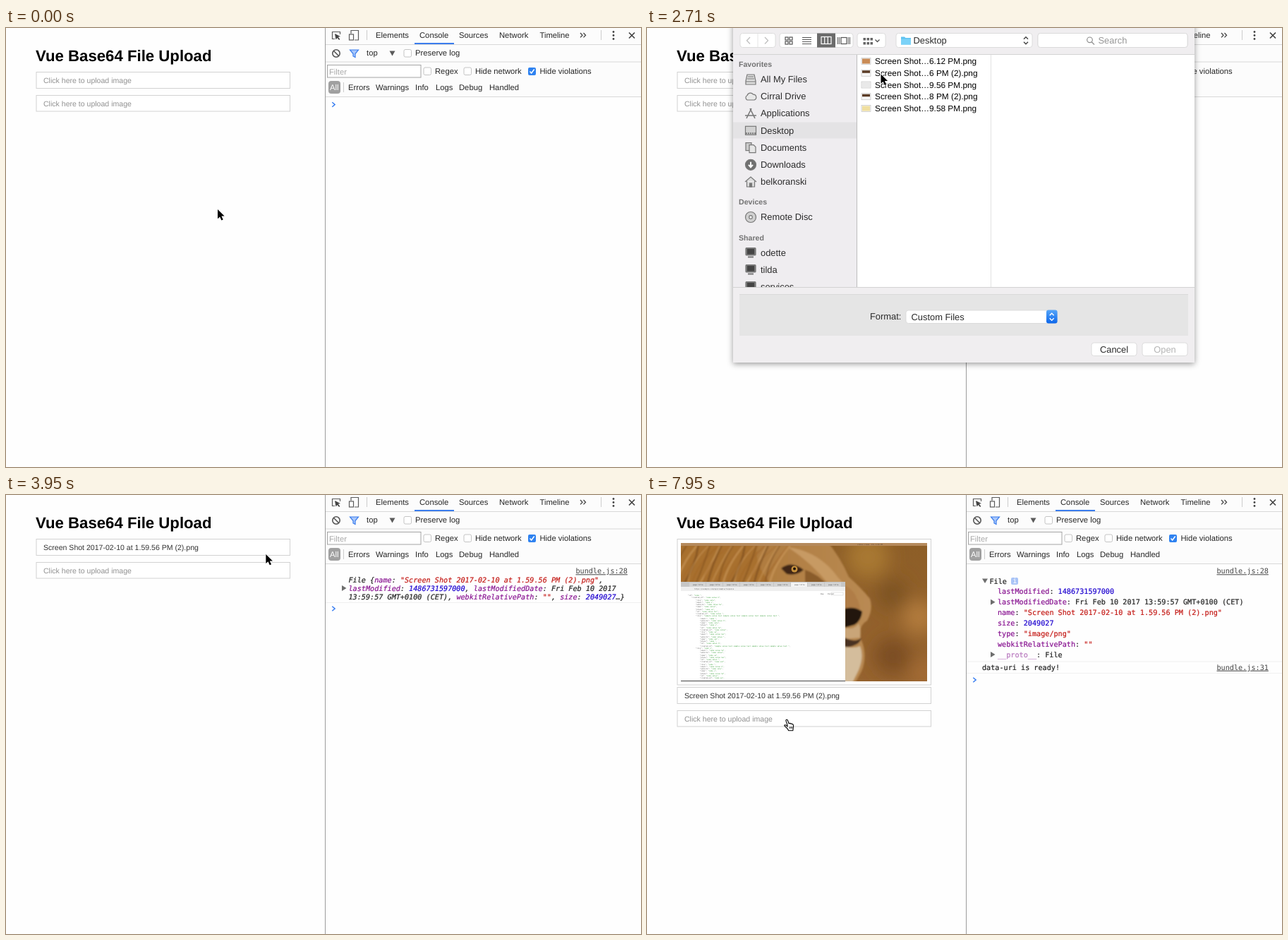
These frames come from a looping animation (900x622 px, 8 s). An HTML page:

```html
<!DOCTYPE html>
<html lang="en">
<head>
<meta charset="utf-8">
<title>File upload demo</title>
<style>
html, body { margin: 0; width: 100%; height: 100%; overflow: hidden; background: #fefefe; }
svg { display: block; width: 900px; height: 622px; text-rendering: geometricPrecision; }
text { font-family: "Liberation Sans", Arial, sans-serif; white-space: pre; }
.title { font-size: 22.2px; font-weight: bold; }
.field { font-size: 10.55px; }
.tool { font-size: 11.25px; fill: #262626; }
.mono { font: 10.16px "DejaVu Sans Mono", Menlo, monospace; fill: #222; stroke: #222; stroke-width: .2; }
.it { font-style: italic; }
.link { text-decoration: underline; fill: #444; stroke: none; }
.mac { font-size: 12.9px; fill: #2b2b2b; }
.head { font-size: 10.6px; font-weight: bold; fill: #727272; }
.file { font-size: 11.85px; }
.info { font-size: 11.9px; }
.tiny { font: 2.4px "DejaVu Sans Mono", monospace; }
</style>
</head>
<body>
<svg id="stage" viewBox="0 0 900 622"></svg>
<script>
const $ = id => document.getElementById(id);
const text = (x, y, s, cls, a = '') => `<text x="${x}" y="${y}" class="${cls}" ${a}>${s}</text>`;
const rect = (x, y, w, h, fill, a = '') =>
  `<rect x="${x}" y="${y}" width="${w}" height="${h}" fill="${fill}" ${a}/>`;
const line = (d, color, a = '') => `<path d="${d}" fill="none" stroke="${color}" ${a}/>`;
const shape = (d, fill, a = '') => `<path d="${d}" fill="${fill}" ${a}/>`;
const disc = (x, y, r, fill, a = '') => `<circle cx="${x}" cy="${y}" r="${r}" fill="${fill}" ${a}/>`;
const group = (id, s, a = '') => `<g id="${id}" ${a}>${s}</g>`;
const ink = color => s => `<tspan fill="${color}" stroke="${color}">${s}</tspan>`;
const key = ink('#881391'), str = ink('#c41a16'), num = ink('#1c00cf'), proto = ink('#b878be');

const fileName = 'Screen Shot 2017-02-10 at 1.59.56 PM (2).png';
const box = (y, h) => rect(43, y, 359.5, h, '#fff', 'stroke="#d2d2d2"');

// Soft lion portrait in a few tones, 349 x 196
function lion() {
  let mane = '';
  for (let i = 0; i < 26; i++)
    mane += line(`M${i * 5.5 - 12} 58q${2 + i % 4 * 5}-28 ${20 + i % 3 * 9}-54`,
      ['#6f4218', '#d3a062', '#a2672a'][i % 3], `stroke-width="${1.5 + i % 2}" opacity=".6"`);
  return rect(0, 0, 349, 196, 'url(#dusk)') +
    `<g filter="url(#haze)">${disc(265, 20, 30, '#a87833') + disc(300, 72, 22, '#7d5222') +
      disc(338, 105, 24, '#b27b3c') + disc(300, 160, 26, '#7b4e20') + disc(345, 185, 20, '#a46c35')}</g>` +
    `<g filter="url(#soft)">` +
    shape('M-5-4H206Q226 20 238 48 254 62 268 79 273 94 264 110 250 118 256 138 265 160 256 182L246 200H-5Z', 'url(#fur)') +
    shape('M-5-4H112Q98 24 128 58H-5Z', '#a8702f') + mane +
    shape('M152 6Q196 12 222 48L250 78 236 92 214 64Q188 30 152 6Z', '#c79a64') +
    shape('M176 38Q204 46 232 92V58H176Z', '#8a5b2c') +
    shape('M232 60Q250 68 254 94L232 92Z', '#b07d47') +
    shape('M142 36Q156 24 174 38 164 47 150 44Z', '#3f2613') +
    shape('M232 93Q246 89 257 97 256 110 246 116L232 120Z', '#24160f') +
    shape('M232 120Q246 124 252 114 256 122 254 134L232 136Z', '#c9a578') +
    shape('M232 134Q248 142 256 134 254 146 232 148Z', '#4a3020') +
    shape('M232 147Q246 150 254 146 260 160 252 180L242 200H232Z', '#d4bd9c') + '</g>' +
    disc(161, 37, 4.5, '#c8923c') + disc(161, 36.5, 2, '#21150c');
}

// Thumbnail: the portrait behind a small browser window
function picture() {
  const words = ['"id"', '"name"', '"email"', '"created_at"', '"phone"', '"website"', '"role"'];
  let rows = '';
  for (let i = 0; i < 37; i++) {
    const long = i === 9 || i === 22;
    const indent = i < 2 ? 10 + i * 5 : i < 10 || i === 23 ? 21 : 27;
    const value = long ? '"' + 'sample value text '.repeat(4) + '"' : '"' + 'some value here'.slice(0, 5 + i * 7 % 10) + '"';
    rows += text(indent, 75 + i * 3.25, `${words[i * 3 % 7]}: <tspan fill="#2f9a2f">${value}</tspan>,`, 'tiny', 'fill="#555"');
  }
  let tabs = '';
  for (let i = 0; i < 9; i++)
    tabs += rect(12 + i * 24, 56, 23, 6, i === 6 ? '#f4f4f4' : '#d4d4d4') + text(17 + i * 24, 60, 'page title', 'tiny', 'fill="#444"');
  return lion() +
    rect(0, 0, 349, 4, '#b58a5d') + text(250, 3, 'status items  Fri 1:59 PM', 'tiny', 'fill="#543"') +
    rect(0, 55, 233, 141, '#fff') + rect(0, 55, 233, 7, '#c6c6c6') + tabs +
    rect(0, 62, 233, 6, '#eeeeee') + text(19, 66, 'https://example.com/api/sample/response', 'tiny', 'fill="#555"') +
    text(198, 73, 'Raw    Parsed', 'tiny', 'fill="#444"') + rect(213, 70, 17, 4, 'none', 'stroke="#ccc" stroke-width=".5"') +
    rows + rect(0, 195, 233, 1, '#444');
}

function page() {
  return text(42, 47, 'Vue Base64 File Upload', 'title') +
    group('photo', box(62.5, 206.5) + '<use href="#pic" x="48" y="68"/>') +
    group('inputs', box(62.5, 23) + box(95.5, 22.5) +
      group('hint', text(53, 78, 'Click here to upload image', 'field', 'fill="#919191"')) +
      group('chosen', text(53, 78, fileName, 'field', 'fill="#333"')) +
      text(53, 110.5, 'Click here to upload image', 'field', 'fill="#919191"'));
}

const check = (x, y) => rect(x - 5, y - 5, 10.5, 10.5, '#fff', 'rx="2" stroke="#c4c4c4"');

function devtools() {
  const tabs = [[524, 'Elements'], [586, 'Console'], [642, 'Sources'], [699, 'Network'], [756.5, 'Timeline']];
  const levels = [[485, 'Errors'], [524, 'Warnings'], [580, 'Info'], [609, 'Logs'], [642, 'Debug'], [685, 'Handled']];
  return rect(453, 0, 447, 622, '#fefefe') + rect(453, 0, 447, 97, '#fcfcfc') +
    line('M453 23.5H900M453 48H900M453 97.5H900', '#d8d8d8') + line('M452.5 0V622', '#9c9c9c') +
    rect(579, 21, 56, 2, '#3b7ded') +
    tabs.map(([x, s]) => text(x, 14, s, 'tool')).join('') +
    line('M473.5 9V5.5H462.5V15.5H466', '#5a5a5a', 'stroke-width="1.2"') +
    shape('M466 8L474 12 470.8 12.8 473.4 16 472 17 469.5 14 467.5 16.5Z', '#444') +
    line('M489 8V3.5H499.5V17H494', '#5a5a5a', 'stroke-width="1.2"') + rect(486.5, 9, 6, 8, '#fff', 'stroke="#5a5a5a" stroke-width="1.2"') +
    line('M511.5 3V17M843.5 3V17M478.5 77V91', '#ccc') +
    line('M814 7l3 3.2-3 3.2M818.5 7l3 3.2-3 3.2', '#444', 'stroke-width="1.3"') +
    [5.5, 10.5, 15.5].map(y => disc(861, y, 1.4, '#444')).join('') +
    line('M883 6.5l8 8m0-8l-8 8', '#444', 'stroke-width="1.7"') +
    disc(468, 36, 5.2, 'none', 'stroke="#555" stroke-width="1.6"') + line('M464.5 32.5l7 7', '#555', 'stroke-width="1.6"') +
    shape('M487.5 31H499.5L495 36.5V41.5L492 40V36.5Z', '#a9c8fb', 'stroke="#3b7ded" stroke-width="1.2"') +
    text(511, 39, 'top', 'tool') + shape('M543.5 32.5H551.5L547.5 39.5Z', '#5a5a5a') +
    check(569, 35.5) + text(580, 39, 'Preserve log', 'tool') +
    rect(455.5, 52.5, 132.5, 17.5, '#fff', 'stroke="#a4a4a4"') + text(458, 65.5, 'Filter', 'tool', 'style="fill:#aaa"') +
    check(597, 61) + text(608, 65, 'Regex', 'tool') + check(654, 61) + text(665, 65, 'Hide network', 'tool') +
    rect(740, 56, 11, 11, '#2f82f0', 'rx="2"') + line('M742.5 61.5l2.2 2.5 4-5.5', '#fff', 'stroke-width="1.5"') +
    text(756.5, 65, 'Hide violations', 'tool') +
    rect(457, 75, 17, 18, '#a0a0a0', 'rx="4"') + text(459, 87.5, 'All', 'tool', 'style="fill:#fff"') +
    levels.map(([x, s]) => text(x, 87.5, s, 'tool')).join('');
}

const right = (x, y) => shape(`M${x} ${y - 4}l6.5 4-6.5 4Z`, '#6e6e6e');
const down = (x, y) => shape(`M${x} ${y - 3}h8l-4 6.5Z`, '#6e6e6e');

function consoleLog() {
  const rows = [
    `${key('lastModified')}: ${num(1486731597000)}`,
    `${key('lastModifiedDate')}: Fri Feb 10 2017 13:59:57 GMT+0100 (CET)`,
    `${key('name')}: ${str(`"${fileName}"`)}`,
    `${key('size')}: ${num(2049027)}`,
    `${key('type')}: ${str('"image/png"')}`,
    `${key('webkitRelativePath')}: ${str('""')}`,
    `${proto('__proto__')}: File`];
  return group('log', text(807.5, 111.3, 'bundle.js:28', 'mono link')) +
    group('folded',
      text(485.5, 123.5, `File {${key('name')}: ${str(`"${fileName}"`)},`, 'mono it') +
      text(485.5, 135.5, `${key('lastModified')}: ${num(1486731597000)}, ${key('lastModifiedDate')}: Fri Feb 10 2017`, 'mono it') +
      text(485.5, 147.5, `13:59:57 GMT+0100 (CET), ${key('webkitRelativePath')}: ${str('""')}, ${key('size')}: ${num(2049027)}…}`, 'mono it') +
      right(476, 132) + line('M453 152.5H900', '#f0f0f0')) +
    group('unfolded', down(475, 121.5) + text(485.5, 125.5, 'File', 'mono') +
      rect(516, 117, 10, 10, '#a9c4f7', 'rx="2"') + text(518.2, 125.3, 'i', 'mono', 'style="fill:#fff;stroke:none"') +
      rows.map((s, i) => text(497, 140.3 + i * 14.9, s, 'mono')).join('') +
      right(487, 151.8) + right(487, 226) + line('M453 236H900', '#f0f0f0')) +
    group('ready', text(475, 3.7, 'data-uri is ready!', 'mono') + text(807.5, 3.7, 'bundle.js:31', 'mono link') +
      line('M453 8.5H900', '#f0f0f0')) +
    group('prompt', line('M462.3 -3.3l3.8 3.3-3.8 3.3', '#367cf1', 'stroke-width="1.5"')) +
    group('caret', rect(475, 256, 1, 12, '#000'));
}

const updown = (x, y, c) => line(`M${x - 3} ${y - 2}l3-3 3 3M${x - 3} ${y + 2}l3 3 3-3`, c, 'stroke-width="1.4"');
const button = (x, y, w, h, fill = '#fff') => rect(x, y, w, h, fill, 'rx="3.5" stroke="#d6d6d6" stroke-width=".8"');
const item = (y, s, icon) => `<g transform="translate(147 ${y})" stroke="#777" stroke-width="1.2" fill="none">${icon}</g>` +
  text(161, y + 4.4, s, 'mac');

function sidebar() {
  const monitor = rect(-7, -7, 14, 10.5, '#777', 'rx="1"') + rect(-5, -5.5, 10, 7.5, '#444', 'stroke="none"') + line('M-4 6H4', '#777', 'stroke-width="2"');
  const screen = rect(-7.5, -6, 15, 12, '#d2d2d2') + line('M-7 4H7', '#777', 'stroke-width="2" stroke-dasharray="2 1"');
  return group('marked', rect(122, 133.5, 175, 23, '#e4e3e5')) +
    text(130, 55, 'Favorites', 'head') +
    item(73, 'All My Files', shape('M-5-7H5L7 2V7H-7V2Z', '#ddd') + line('M-4-4H4M-5-1H5M-7 3H7', '#777')) +
    item(97, 'Cirral Drive', shape('M-5 5A3.6 3.6 0 0 1-5-1.5A4.8 4.8 0 0 1 3.5-2.8A4 4 0 0 1 5 5Z', '#e8e8e8')) +
    item(121, 'Applications', line('M-6 7L1-7M6 7L-1-7M-8 3H8', '#777', 'stroke-width="1.6"')) +
    item(145.3, 'Desktop', screen) +
    item(169.6, 'Documents', rect(-7, -7, 8, 11, '#ccc') + shape('M-2-4H4L7-1V7H-2Z', '#e6e6e6')) +
    item(193.8, 'Downloads', disc(0, 0, 7.5, '#707070') + line('M0-4V3M-3 0L0 3.5 3 0', '#fff', 'stroke-width="2"')) +
    item(218, 'belkoranski', shape('M-8 0L0-7 8 0M-5.5-1V7H5.5V-1', '#ddd') + rect(-1.5, 2, 3, 5, '#777')) +
    text(130, 250, 'Devices', 'head') +
    item(268, 'Remote Disc', disc(0, 0, 7.5, '#d0d0d0') + disc(0, 0, 2.3, '#f2f2f2')) +
    group('media', text(130, 300.5, 'Media', 'head') +
      item(318.5, 'Photos', rect(-7.5, -4, 15, 10, '#777', 'rx="1.5"') + rect(-3, -6, 6, 3, '#777') + disc(0, 1, 3.2, '#777', 'stroke="#eee"')) +
      text(130, 351, 'Tags', 'head') + item(368, 'Красный', disc(0, 0.5, 5.5, '#ff4d47', 'stroke="#e8443e"'))) +
    group('shared', text(130, 300.5, 'Shared', 'head') +
      item(318.5, 'odette', monitor) + item(342.5, 'tilda', monitor) + item(366.5, 'services', monitor));
}

function fileList() {
  const names = ['6.12 PM', '6 PM (2)', '9.56 PM', '8 PM (2)', '9.58 PM'];
  const tones = ['#c98b55', '#5a3b25', '#e9e9e9', '#5a3b25', '#f0dfa0'];
  return names.map((s, i) => {
    const y = 47 + i * 16.75;
    return rect(304, y - 4.5, 13, 9, '#f6f6f6', 'stroke="#bbb" stroke-width=".6"') +
      rect(305, y - 3.5, 11, i % 2 ? 3.5 : 7, tones[i]) +
      text(323, y + 4.1, `Screen Shot…${s}.png`, 'file', i === 1 ? 'id="picked"' : '');
  }).join('');
}

function preview() {
  const when = 'February 10, 2017 at 1:59 PM';
  const facts = [['Created', when], ['Modified', when], ['Last opened', when], ['Dimensions', '1920 × 1080']];
  return '<use href="#pic" transform="translate(517 52) scale(.66)"/>' +
    ['Screen Shot', '2017-02-10 at 1.59.56', 'PM (2).png'].map((s, i) => text(609, 204 + i * 18, s, 'info', 'style="font-size:15px;font-weight:bold"')).join('') +
    text(609, 255.5, 'PNG image - 2 MB', 'info', 'fill="#8c8c8c"') +
    facts.map(([a, b], i) => text(601, 272.6 + i * 15.8, a, 'info', 'fill="#8c8c8c" text-anchor="end"') + text(609, 272.6 + i * 15.8, b, 'info')).join('') +
    text(609, 335.8, 'Add Tags…', 'info', 'fill="#1a7ff0"');
}

function dialog() {
  let grid = '';
  for (let i = 0; i < 4; i++) grid += rect(196 + i % 2 * 6, 13 + (i >> 1) * 6, 4, 4, 'none', 'stroke="#555" stroke-width="1.2"');
  for (let i = 0; i < 6; i++) grid += rect(306.5 + i % 3 * 5, i > 2 ? 20 : 14, 3.5, 3.5, '#666');
  return rect(122, -8, 654, 482, '#f0eef0', 'style="filter:drop-shadow(0 2px 4px rgba(0,0,0,.4))"') +
    rect(122, 38, 175, 329, '#efedf0') + rect(298, 38, 478, 329, '#fff') +
    line('M122 37.5H776M122 367.5H776', '#d3d3d3') + line('M297.5 38V367', '#bdbdbd') + line('M487.5 38V367', '#e2e2e2') +
    button(132, 7.5, 50, 20) + line('M157 8V27', '#e4e4e4') +
    line('M146 13l-4.5 4.7 4.5 4.7M167 13l4.5 4.7-4.5 4.7', '#c2c2c2', 'stroke-width="1.4"') +
    button(188, 7.5, 104, 20) + rect(241, 7.5, 26, 20, '#6b6b6b') + button(298, 7.5, 40, 20) + grid +
    line('M220 13.5H233M220 16.5H233M220 19.5H233M220 22.5H233', '#555', 'stroke-width="1.2"') +
    rect(247, 12.5, 14, 10, 'none', 'stroke="#fff" stroke-width="1.2"') + line('M251.7 12V23M256.3 12V23', '#fff', 'stroke-width="1.2"') +
    rect(275, 13.5, 8, 9, 'none', 'stroke="#555" stroke-width="1.2"') + line('M270.5 13V23M272.7 13V23M285.3 13V23M287.5 13V23', '#555') +
    line('M323.5 16.5l3 3 3-3', '#555', 'stroke-width="1.4"') +
    button(353, 7.5, 193, 20) + updown(537, 17.7, '#444') +
    group('folder', shape('M360 12.5h5l1.5 1.5H374V23.5H360Z', '#5fc3f2') + rect(360, 15.5, 14, 8, '#7ad2f8') + text(377.5, 22.3, 'Desktop', 'mac')) +
    button(554, 7.5, 212, 20, '#f4f3f4') + group('searchBox', button(554, 7.5, 212, 20)) +
    group('search', disc(627.5, 16.8, 3.8, 'none', 'stroke="#8c8c8c" stroke-width="1.2"') + line('M630.3 19.8l3.7 3.8', '#8c8c8c', 'stroke-width="1.3"') +
      text(639.5, 22.3, 'Search', 'mac', 'style="fill:#969696"')) +
    `<g clip-path="url(#side)">${sidebar()}</g>` +
    group('row', rect(298, 55.5, 189, 17, '#116cd6')) + group('files', fileList()) + group('preview', preview()) +
    rect(131, 377.5, 636, 58.5, '#e5e5e5') + line('M131 377.5H767', '#dadada') +
    text(316, 413.3, 'Format:', 'mac') + button(367, 400, 214.5, 18.5) + text(374.5, 413.7, 'Custom Files', 'mac') +
    group('grayStep', updown(573.7, 409.2, '#444')) +
    group('blueStep', rect(566, 399.6, 15.6, 19, 'url(#blue)', 'rx="3"') + updown(573.7, 409.2, '#fff')) +
    button(630, 446, 64, 18.5) + text(662, 459.6, 'Cancel', 'mac', 'text-anchor="middle"') +
    button(702, 446, 64, 18.5) + group('enabled', rect(702, 445.6, 64.5, 19.3, 'url(#blue)', 'rx="3.5"')) +
    text(734, 459.6, 'Open', 'mac', 'id="open" text-anchor="middle"');
}

const gradient = (id, a, b, dir = 'x2="0" y2="1"') =>
  `<linearGradient id="${id}" ${dir}><stop stop-color="${a}"/><stop offset="1" stop-color="${b}"/></linearGradient>`;
const blur = (id, r) => `<filter id="${id}" x="-.3" y="-.3" width="1.6" height="1.6"><feGaussianBlur stdDeviation="${r}"/></filter>`;

$('stage').innerHTML = `<defs>${gradient('dusk', '#8d5e27', '#96632f')}${gradient('fur', '#a8712f', '#b98a53', '')}
  ${gradient('blue', '#55a5f9', '#0c66ea')}${blur('soft', 1)}${blur('haze', 12)}
  <clipPath id="side">${rect(122, 38, 175, 329, '#000')}</clipPath>
  <clipPath id="frame">${rect(0, 0, 349, 196, '#000')}</clipPath>
  <g id="pic" clip-path="url(#frame)">${picture()}</g></defs>` +
  page() + devtools() + consoleLog() + group('dialog', dialog()) +
  group('arrow', shape('M0 0V13.2L3.1 10.4 5.4 15.4 7.7 14.4 5.4 9.6H9.6Z', '#000', 'stroke="#fff" stroke-width="1.6" paint-order="stroke"')) +
  group('hand', shape('M5 8.6L3 2.6Q2.6 1 3.8.8 5 .6 5.4 1.8L7 6.2Q8.6 5.4 9.2 6.6 10.6 5.9 11.3 7 12.8 6.7 13.2 8 14 11 13.2 13L12.8 16.2H6.6Q5.5 13.5 3.5 12L1 9.7Q.3 8.6 1.6 8.3 3 8.2 5 10.4Z',
    '#fff', 'stroke="#000" stroke-width="1.1"') + line('M8.2 10.5V13.5M10 10.5V13.5M11.7 10.5V13.5', '#000', 'stroke-width=".8"'));

// The screen refreshes in bursts: first time, last time, number of updates
const bursts = [[0, 0, 1], [150, 450, 3], [750, 750, 1], [1190, 1490, 3], [1640, 2120, 4], [2270, 2710, 4],
  [3010, 3300, 3], [3440, 3590, 2], [3950, 4530, 5], [4680, 4980, 3], [5130, 5130, 1], [5420, 6020, 5],
  [6470, 7500, 8], [7650, 7650, 1], [7950, 7950, 1]];
const ticks = bursts.flatMap(([a, b, n]) =>
  Array.from({ length: n }, (_, i) => Math.round(a + (n > 1 ? (b - a) * i / (n - 1) : 0))));

// Pointer path: time, x, y
const route = [[0, 300, 257], [450, 187, 86], [750, 166, 75], [1100, 166, 75], [1490, 197.5, 140], [1640, 197.5, 140],
  [2120, 354, 103], [2710, 331.5, 65.5], [3010, 329, 66], [3800, 329, 66], [4530, 520.5, 153], [4980, 485, 133],
  [5130, 478, 131], [5420, 478, 131], [6020, 560.5, 224], [6320, 560.5, 224], [6910, 400, 179], [7350, 194, 284],
  [7500, 208, 294], [7650, 194, 317.5], [8000, 194, 317.5]];

function pointer(t) {
  const i = route.findIndex(p => p[0] > t);
  const [t0, x0, y0] = route[i - 1], [t1, x1, y1] = route[i];
  const k = (t - t0) / (t1 - t0);
  return [x0 + (x1 - x0) * k, y0 + (y1 - y0) * k];
}

const smooth = p => (p = Math.max(0, Math.min(1, p)), p * p * (3 - 2 * p));
const show = (id, on) => $(id).style.display = on ? '' : 'none';
const move = (id, x, y) => $(id).setAttribute('transform', `translate(${x} ${y})`);

function render(time) {
  const t = ticks.filter(v => v <= time).pop();
  const logged = t >= 3950, loaded = t >= 4095, open = t >= 5420;
  const active = t >= 1640, listed = t >= 1790, picked = t >= 3010;

  show('photo', loaded);
  move('inputs', 0, loaded ? 210 : 0);
  show('hint', !logged);
  show('chosen', logged);

  show('log', logged);
  show('folded', logged && !open);
  show('unfolded', open);
  show('ready', loaded);
  move('ready', 0, open ? 244 : 161);
  move('prompt', 0, open ? 262 : loaded ? 179 : logged ? 161 : 108.5);
  show('caret', open && (t - 5420) % 1030 < 460);

  show('dialog', t >= 1190 && t < 3590);
  move('dialog', 0, Math.round(-482 * (1 - smooth((t - 1100) / 300) + smooth((t - 3155) / 290))));
  for (const id of ['marked', 'folder', 'searchBox', 'blueStep']) show(id, active);
  show('grayStep', !active);
  $('search').style.opacity = active ? 1 : .5;
  show('media', !listed);
  show('shared', listed);
  show('files', listed);
  for (const id of ['row', 'preview', 'enabled']) show(id, picked);
  $('picked').style.fill = picked ? '#fff' : '#000';
  $('open').style.fill = picked ? '#fff' : '#b4b4b4';

  const [x, y] = pointer(t);
  const overField = (t >= 450 && t < 1190) || (t > 6470 && x < 403);
  show('hand', overField);
  show('arrow', !overField);
  move(overField ? 'hand' : 'arrow', x, y);
}

const start = performance.now();
function tick() {
  render((performance.now() - start) % 8000);
  requestAnimationFrame(tick);
}
tick();
</script>
</body>
</html>
```
